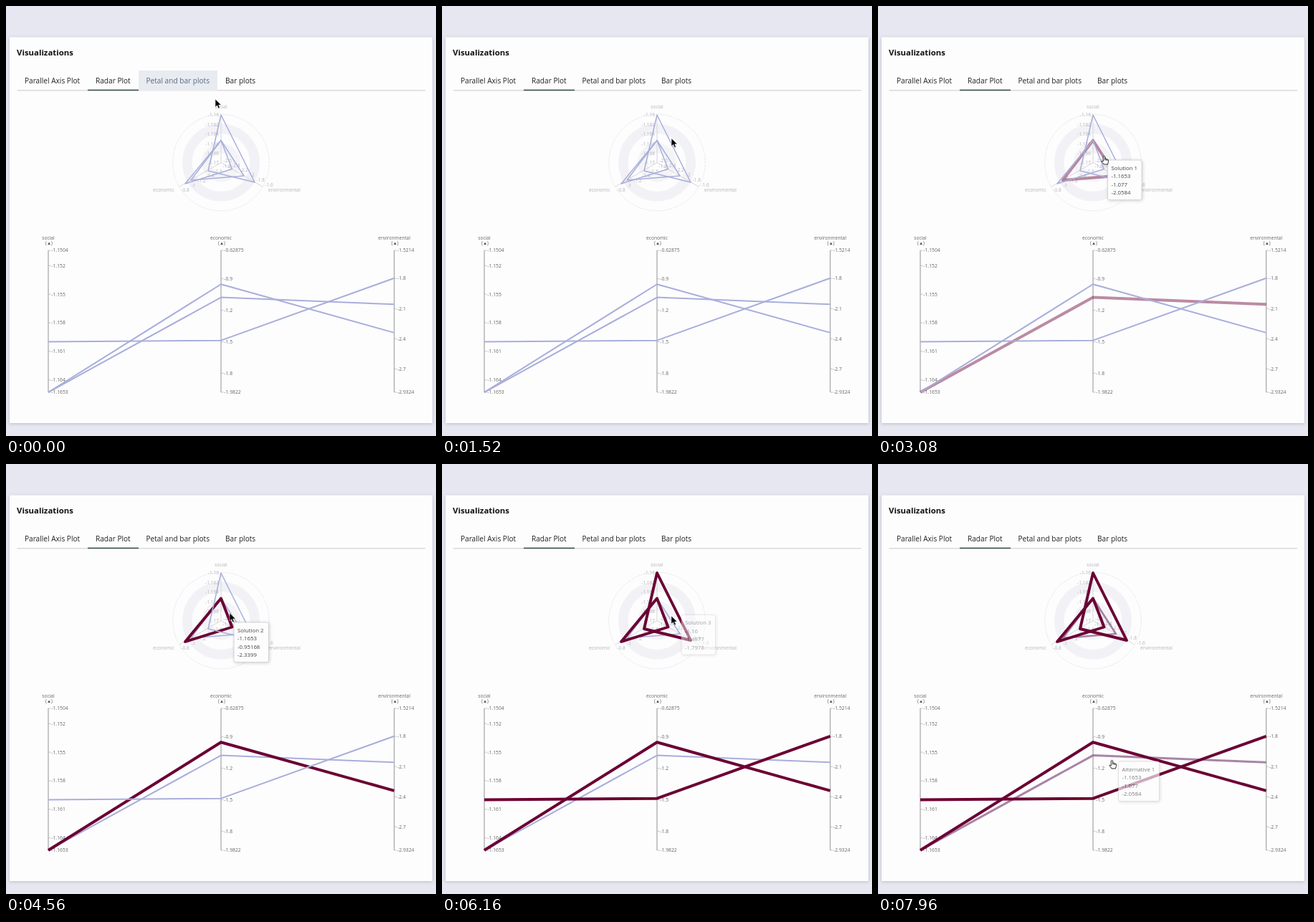
These frames come from a looping animation (600 by 600 pixels, 8000 ms). An HTML page:

```html
<!DOCTYPE html>
<html lang="en">
<head>
<meta charset="utf-8">
<title>Radar plot</title>
<style>
  html, body { margin: 0; height: 100%; overflow: hidden; background: #e6e7f0; }
  svg { display: block; width: 100vw; height: 100vh; font-family: "Open Sans", "Noto Sans", sans-serif; }
  .card { fill: #fdfdfe; filter: drop-shadow(0 1px 2px rgba(60, 60, 90, .25)); }
  .box { fill: #fff; fill-opacity: .95; stroke: #ccc; stroke-width: .8; filter: drop-shadow(1px 1px 2px rgba(0, 0, 0, .18)); }
</style>
</head>
<body>
<svg id="stage" viewBox="0 0 600 600"></svg>
<script>
const LOOP = 8000;
const stage = document.getElementById('stage');
const BLUE = [168, 174, 219, 1], MAUVE = [107, 0, 51, .45], WINE = [107, 0, 51, 1];

function add(tag, attrs, parent = stage, content) {
  const el = document.createElementNS('http://www.w3.org/2000/svg', tag);
  set(el, attrs);
  if (content !== undefined) el.textContent = content;
  parent.appendChild(el);
  return el;
}
function set(el, attrs) {
  for (const key in attrs) el.setAttribute(key, attrs[key]);
}
function label(x, y, str, size, fill, anchor = 'start', parent = stage) {
  return add('text', { x, y, 'font-size': size, fill, 'text-anchor': anchor }, parent, str);
}
const clamp = v => Math.max(0, Math.min(1, v));
const mix = (a, b, p) => a + (b - a) * p;
const ramp = (t, start, span) => clamp((t - start) / span);
const pulse = (t, from, to, span = 160) => ramp(t, from, span) * (1 - ramp(t, to, span));

// Card and tabs
add('rect', { class: 'card', x: 5, y: 43.5, width: 590, height: 538.5, rx: 1 });
set(label(15, 69, 'Visualizations', 11.4, '#111'), { 'font-weight': 700 });
add('rect', { x: 15.5, y: 117.3, width: 569.5, height: 1, fill: '#c9c9d1' });
const tabHover = add('rect', { x: 185, y: 90, width: 110, height: 28, fill: '#e8ebf0' });
add('rect', { x: 114, y: 116.6, width: 71, height: 1.6, fill: '#3b5349' });
label(26, 107.5, 'Parallel Axis Plot', 10.1, '#222');
label(125, 107.5, 'Radar Plot', 10.1, '#222');
const tabText = label(195.5, 107.5, 'Petal and bar plots', 10.1, '#222');
label(306, 107.5, 'Bar plots', 10.1, '#222');

// Radar background
const CX = 300, CY = 218.5, STEP = 13.4, DX = 11.6, DY = 6.7;
for (const [r, fill] of [[54, '#f2f2f6'], [40.5, '#fdfdfe'], [27, '#f4f4f7'], [13.5, '#fdfdfe']])
  add('circle', { cx: CX, cy: CY, r, fill });
add('circle', { cx: CX, cy: CY, r: 67.3, fill: 'none', stroke: '#dcdce0', 'stroke-width': .8, 'stroke-dasharray': '2 1.5' });
add('path', {
  d: `M${CX} ${CY}V152M${CX} ${CY}L242 252M${CX} ${CY}L358 252`,
  stroke: '#d2d2d6', 'stroke-width': .9, fill: 'none'
});
const PALE = '#b4b4b8';
for (let i = 0; i < 6; i++) {
  label(297, 154.3 + i * STEP, ['-1.16', '-1.162', '-1.164', '-1.166', '-1.168', '-1.17'][i], 6.5, PALE, 'end');
  label(250 + i * DX, 259.3 - i * DY, +(-0.8 - i * .2).toFixed(1), 6.5, PALE, 'middle');
  label(367 - i * DX, 251.5 - i * DY, +(-1.6 - i * .2).toFixed(1), 6.5, PALE, 'middle');
}
label(300, 143, 'social', 6.6, PALE, 'middle');
label(205, 259.3, 'economic', 6.6, PALE);
label(366, 259.3, 'environmental', 6.6, PALE);

// Parallel axes
const AXES = [
  { x: 59, name: 'social', top: -1.1504, end: -1.1653, ticks: [-1.152, -1.155, -1.158, -1.161, -1.164] },
  { x: 300, name: 'economic', top: -0.62875, end: -1.9822, ticks: [-0.9, -1.2, -1.5, -1.8] },
  { x: 541.7, name: 'environmental', top: -1.5214, end: -2.9324, ticks: [-1.8, -2.1, -2.4, -2.7] }
];
const axisY = (axis, v) => 341 + (v - axis.top) / (axis.end - axis.top) * 198;
for (const axis of AXES) {
  add('path', { d: `M${axis.x} 341V539`, stroke: '#a3a3a6', 'stroke-width': 1.2 });
  label(axis.x, 326, axis.name, 6.6, '#666', 'middle');
  label(axis.x + 1, 332.5, '(▲)', 6.2, '#555', 'middle');
  for (const v of [axis.top, ...axis.ticks, axis.end]) {
    const y = axisY(axis, v);
    add('path', { d: `M${axis.x} ${y}h3.5`, stroke: '#b5b5b8', 'stroke-width': .8 });
    label(axis.x + 4.3, y + 2.4, v, 6.8, '#666');
  }
}

// Solutions: hover spans [from, to] and the moment of the click
const SOLUTIONS = [
  { v: [-1.1653, -1.077, -2.0584], radar: '300,187.5 332,237 258,243', hover: [[2650, 3420], [7880, 9000]], click: 9000 },
  { v: [-1.1653, -0.95168, -2.3399], radar: '300,187.5 315.5,227.5 250,248', hover: [[3450, 9000]], click: 4100 },
  { v: [-1.16, -1.4877, -1.7978], radar: '300,152 347,246 282,230', hover: [[1700, 2620], [5150, 9000]], click: 5550 }
];
for (const s of SOLUTIONS) {
  const shape = { fill: 'none', 'stroke-linejoin': 'round' };
  s.web = add('polygon', { points: s.radar, ...shape });
  s.line = add('polyline', { points: s.v.map((v, i) => `${AXES[i].x},${axisY(AXES[i], v)}`).join(' '), ...shape });
}

// Tooltips
const TIPS = [
  { sol: 2, x: 326, y: 192, w: 47, span: [1700, 2600] },
  { sol: 0, x: 320.5, y: 215, w: 47.5, span: [2680, 3400] },
  { sol: 1, x: 318, y: 221, w: 48.5, span: [3450, 4600] },
  { sol: 2, x: 334, y: 210.5, w: 47.5, span: [5150, 6080] },
  { sol: 0, x: 335.5, y: 415, w: 57, span: [7850, 9000], name: 'Alternative' }
];
for (const tip of TIPS) {
  tip.g = add('g', { transform: `translate(${tip.x} ${tip.y})` });
  add('rect', { class: 'box', width: tip.w, height: 55.5, rx: 2.5 }, tip.g);
  [`${tip.name || 'Solution'} ${tip.sol + 1}`, ...SOLUTIONS[tip.sol].v].forEach((str, i) =>
    label(5, 13.8 + i * 11.4, str, 7.8, '#444', 'start', tip.g));
}

// Pointer
const arrow = add('path', { d: 'M0 0V11L2.6 8.7L4.4 12.8L6.3 12L4.6 8H8.2Z', fill: '#000', stroke: '#fff', 'stroke-width': .5 });
const hand = add('path', {
  d: 'M-1.2 1Q0 -.5 1.1 1V4.3Q2.2 3.7 2.9 4.7Q4 4.2 4.5 5.2Q5.7 4.9 5.9 6.2V8.5Q5.6 10 4.9 12H-.5Q-1.6 9.8 -3.7 7.8Q-3.6 6.3 -1.2 7.8ZM1.1 4.3V6.4M2.9 4.7V6.6M4.5 5.2V6.8',
  fill: '#fff', stroke: '#111', 'stroke-width': .9, 'stroke-linejoin': 'round'
});
const PATH = [
  [0, 292, 130], [500, 315, 158], [880, 324, 174], [1600, 320, 185], [2400, 320, 185], [2800, 315.5, 209],
  [3200, 315.5, 209], [3500, 312, 214], [4400, 312, 214], [4560, 312, 208], [5100, 328, 203],
  [5950, 328, 203], [6160, 320, 212], [6800, 321, 228], [7850, 326.5, 413], [8000, 326.5, 413]
];
const HAND_SPANS = [[1700, 4450], [5150, 6000], [7850, 8000]];

function pointerAt(t) {
  const i = PATH.findIndex(k => k[0] > t);
  const [t0, x0, y0] = PATH[i - 1], [t1, x1, y1] = PATH[i];
  let p = (t - t0) / (t1 - t0);
  if (t0 >= 880) p = p * p * (3 - 2 * p);
  return [mix(x0, x1, p), mix(y0, y1, p)];
}

function render(t) {
  const fade = 1 - ramp(t, 60, 200);
  set(tabHover, { opacity: fade });
  set(tabText, { fill: `rgb(${mix(34, 93, fade)},${mix(34, 105, fade)},${mix(34, 130, fade)})` });

  for (const s of SOLUTIONS) {
    const h = Math.max(...s.hover.map(([from, to]) => pulse(t, from, to)));
    const c = ramp(t, s.click, 160);
    const stroke = `rgba(${BLUE.map((b, i) => mix(mix(b, MAUVE[i], h), WINE[i], c)).join()})`;
    set(s.line, { stroke, 'stroke-width': mix(2, 4, h) });
    set(s.web, { stroke, 'stroke-width': mix(1.5, 3.9, h) });
  }
  for (const tip of TIPS) set(tip.g, { opacity: pulse(t, ...tip.span, 160) });

  const [x, y] = pointerAt(t);
  const onLine = HAND_SPANS.some(([from, to]) => t >= from && t < to);
  for (const [el, shown] of [[arrow, !onLine], [hand, onLine]])
    set(el, { transform: `translate(${x} ${y})`, visibility: shown ? 'visible' : 'hidden' });
}

const start = performance.now();
function tick(now) {
  render(Math.max(0, now - start) % LOOP);
  requestAnimationFrame(tick);
}
render(0);
requestAnimationFrame(tick);
</script>
</body>
</html>
```
